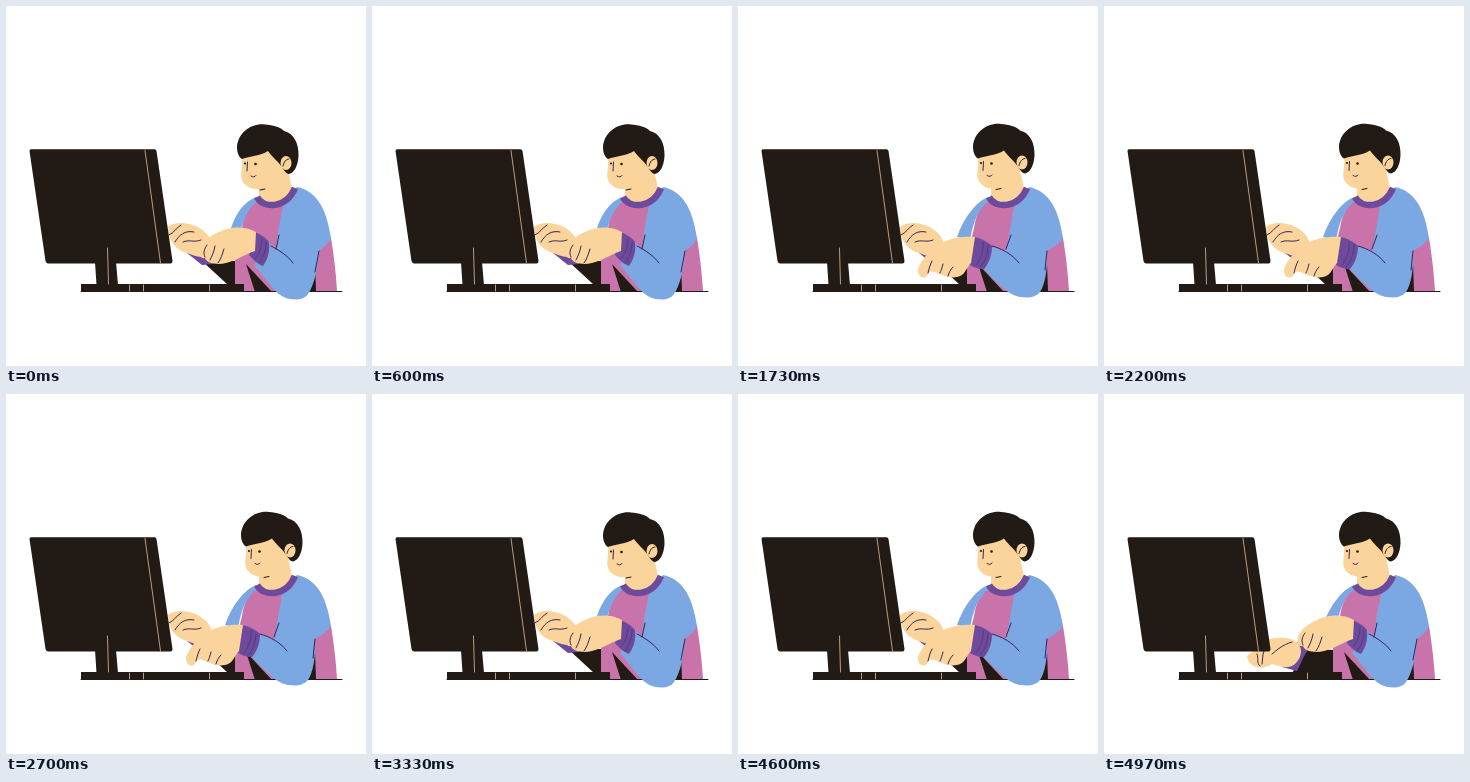
An HTML page that plays this animation: 360x360 px, repeating every 5000 ms.

```html
<!DOCTYPE html>
<html lang="en">
<head>
<meta charset="utf-8">
<style>
  html, body { margin: 0; height: 100%; overflow: hidden; background: #fff; }
  svg { display: block; width: 100vw; height: 100vh; }
  path { stroke-linejoin: round; stroke-linecap: round; }
  .ink { fill: #221a14; }
  .skin { fill: #fad49a; }
  .pink { fill: #c973ab; }
  .blue { fill: #7ba8e2; }
  .purple { fill: #6d4a9b; }
  .line { fill: none; stroke: #33245c; stroke-width: 1; }
  .thin { fill: none; stroke: #45306f; stroke-width: .6; }
  .dark { fill: none; stroke: #221a14; stroke-width: 1; }
  .pale { fill: none; stroke: #b79d88; stroke-width: 1; }
</style>
</head>
<body>
<svg viewBox="0 0 360 360">
  <path class="dark" d="M75 285.5H336"/>
  <path id="shade" class="ink"/>
  <path class="pink" d="M250 192C243 198 238 209 236 222L229 250V285H331C330 268 328 250 325 232L290 184Z"/>
  <path class="ink" d="M240 258L266 286H249ZM309 258L301 285H310Z"/>
  <path id="shoulder" class="blue"/>
  <path class="skin" d="M253 178V194C260 203 277 201 286 182L281 160Z"/>
  <path id="arm" class="blue"/>
  <path id="crease" class="line"/>
  <path d="M251 191C257 203 280 203 289 182" fill="none" stroke="#6d4a9b" stroke-width="6.5" style="stroke-linecap:butt"/>
  <g id="head">
    <path class="skin" d="M236 148C237 160 234 169 236 174C239 181 247 184 254 183C265 182 274 174 279 163L270 140Z"/>
    <path class="ink" d="M231 141C232 127 245 117 259 118.500C267 119 274 121 278 125C288 127 293 138 292.500 150C292 160 288 167 283 168C280 168 278 164 275 160C271 154 265 150 262 145C254 150 244 150 236 153C233 151 231 147 231 141Z"/>
    <ellipse class="skin" cx="280" cy="157" rx="5.500" ry="7"/>
    <path class="dark" d="M277 160C278 156 280 153 283 153M254 184L259 183"/>
    <path class="line" d="M241.500 156L241 165M245 170C247 171.500 249 171 250 169.500" stroke-width=".8"/>
    <circle class="ink" cx="239" cy="157.500" r="1.100"/>
    <circle class="ink" cx="249.500" cy="158" r="1.300"/>
  </g>
  <path id="backCuff" class="purple"/>
  <path id="backHand" class="skin"/>
  <path id="backFingers" class="line"/>
  <path class="ink" d="M25 143.200H148.500Q150 143.200 150.500 145L166.500 255Q166.500 257.500 164.500 257.500H42Q40 257 39.500 255L23.500 145Q23.500 143.200 25 143.200ZM89 256H110L112 279H90.500ZM75 278H238V286H75Z"/>
  <path class="pale" d="M139 144.500L154.500 257M101.500 242L102.500 278M123.500 279V285M137.500 279V285M203.500 279V285"/>
  <path id="cuff" class="purple"/>
  <path id="ribs" class="thin"/>
  <path id="hand" class="skin"/>
  <path id="fingers" class="line"/>
</svg>
<script>
const LOOP = 5000, TAPS = 21, FRAMES = 125;

// Raised and pressed outline of each moving part.
const front = {
  arm: ['M263 236L270 243C271 229 274 214 277 200L291 181C309 185 320 199 325 232C322 238 317 242 313 245C312 262 308 280 302 288C298 294 290 294 284 293C270 291 262 275 248 259Z',
        'M254 240L268 245C271 229 274 214 276 200L291 181C309 185 320 199 325 232C321 238 314 242 309 245C310 262 307 279 302 286C297 292 289 292 283 291C271 290 258 276 246 263Z'],
  crease: ['M265 240C273 244 282 250 287 257M273 229L270 243M313 245L309 266',
           'M254 240C265 243 275 249 281 257M273 229L268 243M309 245L307 264'],
  cuff: ['M248 226C254 228 260 232 263 236C264 245 262 253 257 260C252 258 247 254 243 249Z',
         'M236 231C243 232 250 236 254 240C254 249 251 257 246 263C240 263 234 261 230 257Z'],
  ribs: ['M256 233C256 241 253 249 249 253M260 236C260 245 257 252 253 257',
         'M245 236C246 244 243 253 238 259M250 239C250 248 247 256 242 261'],
  hand: ['M250 226C238 219 222 221 213 226C204 230 196 236 194 243C192 249 195 253 199 252C201 258 212 259 220 257C229 255 238 249 249 245Z',
         'M237 231C226 230 212 232 204 237C194 242 184 252 180 263C179 271 187 275 190 268C194 260 205 274 219 271C227 270 228 262 233 257Z'],
  fingers: ['M201 239C198 243 197 247 199 251M209 240C208 246 206 250 204 254M218 243C216 249 215 253 212 257',
            'M194 255C192 259 191 263 190 267M205 258C204 262 203 265 202 267M215 261C212 264 211 267 210 270']
};
const back = {
  shade: ['M196 255L232 255L230 284L222 279Z', 'M204 255L232 256L238 279L188 279Z'],
  backCuff: ['M203 244L207 258L196 259L181 247Z', 'M193 248L205 252L193 277L178 273Z'],
  backHand: ['M162 221C170 214 186 217 195 223C205 230 208 239 205 247C198 254 188 250 181 247C170 244 166 237 163 230Z',
             'M163 246C172 243 184 243 191 247C199 252 199 262 191 270C184 276 174 272 168 270C156 278 144 272 143 262Z'],
  backFingers: ['M163 229C168 227 171 221 175 219M169 236C173 229 179 224 188 226M177 236C183 233 188 237 195 234',
                'M153 260C155 264 152 269 156 272M160 257C158 262 159 266 158 270M168 260C173 256 178 251 188 248']
};
const lean = {
  shoulder: ['M250 191C238 196 230 207 225 222L235 224C238 212 242 204 250 196Z',
             'M250 191C238 196 226 211 219 231L232 234C236 213 241 203 250 196Z']
};

const mod = x => x - Math.floor(x);
const ramp = (a, b, x) => {
  const k = Math.min(1, Math.max(0, (x - a) / (b - a)));
  return k * k * (3 - 2 * k);
};
const press = p => ramp(.02, .14, p) - ramp(.37, .44, p);
const nod = p => ramp(.06, .22, p) - ramp(.37, .44, p);

function morph(parts, k) {
  for (const id in parts) {
    const [from, to] = parts[id], ends = to.match(/[\d.]+/g);
    let i = 0;
    const d = from.replace(/[\d.]+/g, n => (+n + (ends[i++] - n) * k).toFixed(2));
    document.getElementById(id).setAttribute('d', d);
  }
}

const head = document.getElementById('head');
const start = performance.now();

function draw(now) {
  const t = Math.max(0, now - start) % LOOP;
  // 25 drawings per second, shown on a 30 Hz grid.
  const step = Math.floor(Math.floor(t * .03 + .15) * 5 / 6) % FRAMES;
  const p = mod(step * TAPS / FRAMES);
  const k = nod(p % .5);
  morph(front, press(p));
  morph(back, press(mod(p + .5)));
  morph(lean, k);
  head.setAttribute('transform', `translate(${4 * k} ${-.5 * k})`);
  requestAnimationFrame(draw);
}
draw(start);
</script>
</body>
</html>
```
